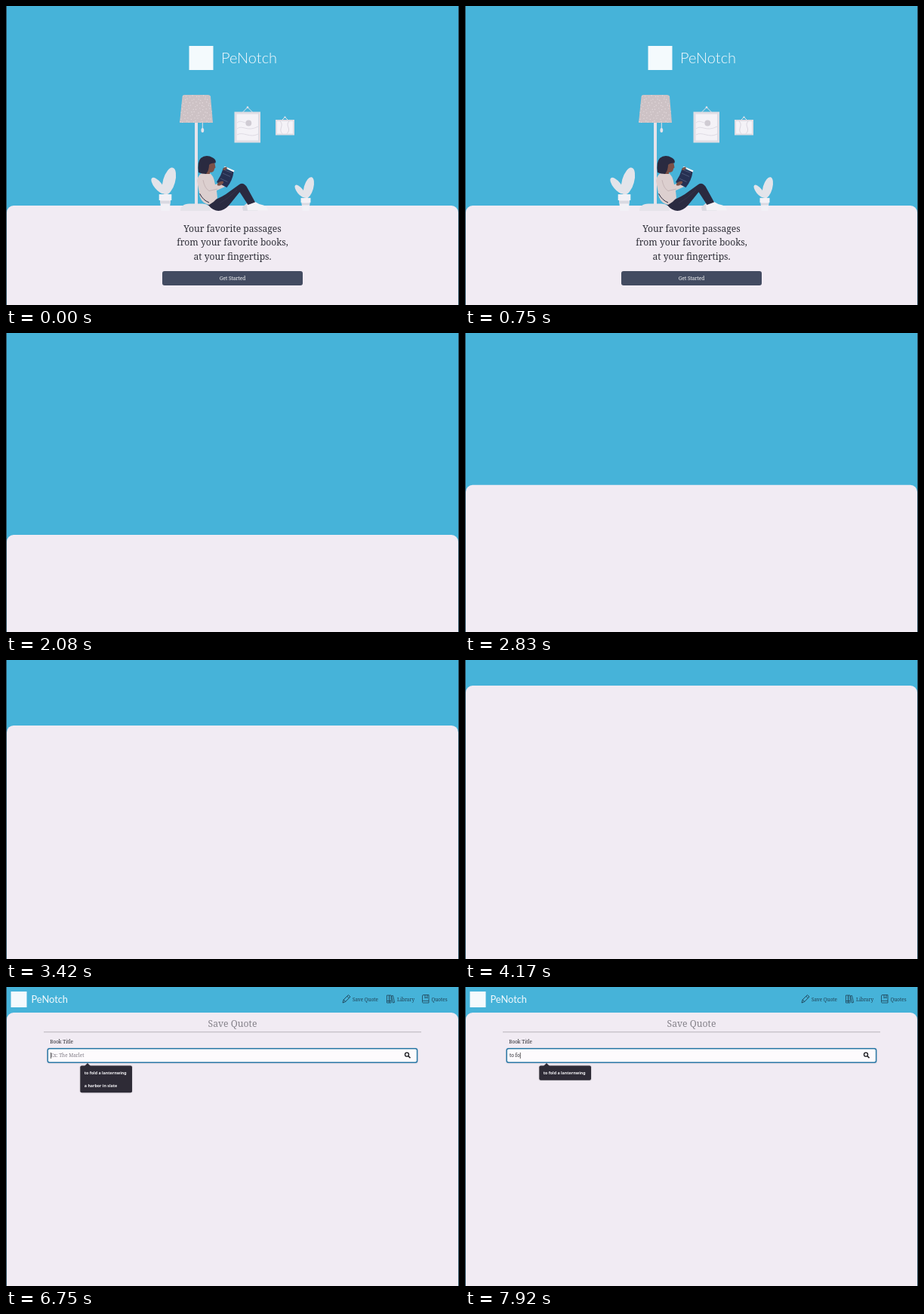
Animation of 600x397 px, one loop 8 s. Source, as an HTML page with a canvas:

```html
<!DOCTYPE html>
<html lang="en">
<head>
<meta charset="utf-8">
<title>PeNotch</title>
<style>
  html, body { margin: 0; width: 100%; height: 100%; overflow: hidden; background: #46b3d9; }
  canvas { display: block; width: 600px; height: 397px; }
</style>
</head>
<body>
<canvas id="stage"></canvas>
<script>
const W = 600, H = 397, LOOP = 8000;
const BLUE = '#46b3d9', PANEL = '#f1ebf3', PALE = '#e5e3ea', NAVY = '#2a2a40', SKIN = '#7b5148', INK = '#1f3f52';
const SLAB = '"Noto Serif", serif', SANS = '"Noto Sans", sans-serif', BRAND = 'Lato, sans-serif';

const canvas = document.getElementById('stage');
const g = canvas.getContext('2d');
const dpr = window.devicePixelRatio || 1;
canvas.width = W * dpr;
canvas.height = H * dpr;

const clamp = v => Math.max(0, Math.min(1, v));
const ramp = (t, a, b) => {
  const k = clamp((t - a) / (b - a));
  return k * k * (3 - 2 * k);
};

// Panel top edge over time: it dips, then rises and settles under the header.
const slide = [[1920, 265], [2080, 268], [2450, 280], [2830, 202], [3330, 97], [3420, 87], [3700, 56], [4150, 34]];

function slope(i) {
  const a = slide[i - 1], b = slide[i], c = slide[i + 1];
  if (!a || !c || (b[1] - a[1]) * (c[1] - b[1]) <= 0) return 0;
  return (c[1] - a[1]) / (c[0] - a[0]);
}

function panelTop(t) {
  if (t <= slide[0][0]) return slide[0][1];
  for (let i = 0; i < slide.length - 1; i++) {
    const [t0, y0] = slide[i], [t1, y1] = slide[i + 1];
    if (t > t1) continue;
    const d = t1 - t0, s = (t - t0) / d, r = 1 - s;
    return y0 * (1 + 2 * s) * r * r + y1 * s * s * (3 - 2 * s)
      + d * s * r * (slope(i) * r - slope(i + 1) * s);
  }
  return slide[slide.length - 1][1];
}

function text(str, x, y, size, color, family = SLAB, weight = 400, align = 'left') {
  g.font = `${weight} ${size}px ${family}`;
  g.textAlign = align;
  g.fillStyle = color;
  g.fillText(str, x, y);
}

function fill(d, color) {
  g.fillStyle = color;
  g.fill(new Path2D(d));
}

function line(d, color, width = 1) {
  g.strokeStyle = color;
  g.lineWidth = width;
  g.stroke(new Path2D(d));
}

function rect(x, y, w, h, color) {
  g.fillStyle = color;
  g.fillRect(x, y, w, h);
}

function round(x, y, w, h, r, color) {
  g.beginPath();
  g.roundRect(x, y, w, h, r);
  g.fillStyle = color;
  g.fill();
}

function oval(x, y, rx, ry, color, turn = 0) {
  g.beginPath();
  g.ellipse(x, y, rx, ry, turn, 0, Math.PI * 2);
  g.fillStyle = color;
  g.fill();
}

function fade(alpha, draw) {
  if (alpha <= 0) return;
  g.save();
  g.globalAlpha = alpha;
  draw();
  g.restore();
}

function lamp() {
  round(250, 150, 4, 115, 0, PALE);
  fill('M231 272 Q231 263 243 262.5 H260 Q271 263 271 272 Z', PALE);
  line('M260.3 154 V163', PALE, 1);
  oval(260.3, 165, 1.9, 3, PALE);
  const shade = new Path2D('M236 118 H268 Q270.5 118 271 120.500 L274 155 H230 L233.500 120.500 Q234 118 236 118 Z');
  g.fillStyle = '#cdc2c5';
  g.fill(shade);
  g.save();
  g.clip(shade);
  for (let row = 0; row < 9; row++) {
    for (let col = 0; col < 11; col++) {
      const x = 230 + col * 4.4 + (row % 2) * 2.2 + Math.sin(row * 5 + col * 3);
      const y = 120 + row * 4.2 + Math.cos(col * 4 + row);
      oval(x, y, 0.7, 0.7, '#e3d9dc');
    }
  }
  g.restore();
}

function pictures() {
  line('M313.5 141 L320 134.5 L326.5 141', PALE, 1);
  oval(320, 134.5, 1.3, 1.3, PALE);
  rect(302.5, 140.5, 34.5, 41, '#dfdde4');
  rect(305.5, 143.5, 28.5, 35, '#f4f2f7');
  oval(321.300, 155.500, 3.9, 3.9, '#cfcbd3');
  line('M306 163 C313 157 319 168 334 160 M306 171 C314 166 323 176 334 170 M306 155 C311 151 314 155 318 155', '#dcd9e1', 0.9);

  line('M365.5 151.500 L369.5 147.500 L373.5 151.500', PALE, 1);
  oval(369.5, 147.500, 1.1, 1.1, PALE);
  rect(357, 151, 25, 20.5, '#dfdde4');
  rect(359, 153, 21, 16.5, '#f4f2f7');
  line('M363 153 C369 158 360 164 366 169.500 M375 153 C369 159 379 163 372 169.500', '#d6d3dc', 0.9);
}

function plant(x, size) {
  g.save();
  g.translate(x, 272);
  g.scale(size, size);
  line('M0 -20 L5 -38 M0 -20 L-9 -33', '#dcdce3', 1);
  oval(5, -39.5, 8, 18.5, '#e3e4ea', 0.27);
  oval(-9.500, -33.500, 5.2, 13, '#e3e4ea', -0.68);
  rect(-8.3, -22, 16.6, 8, '#f2f1f6');
  fill('M-7 -14 H7 L5.5 0 H-5.5 Z', '#f2f1f6');
  fill('M-7 -13.5 H7 L6.5 -9.5 H-6.500 Z', '#d9d9e1');
  g.restore();
}

function reader() {
  // shoes
  fill('M313 267 L320 261 Q327 266 333 267.500 Q335 271 333 272 H314 Z', '#dcdbe3');
  fill('M319 264 L329 259.500 Q335 263.500 341 264.500 Q346 266 347 271.500 H320 Z', '#f3f2f6');
  // legs
  fill('M266 261 Q280 257 291 250 L309 237 Q314 233.500 318.500 239.500 L330 260.500 L320.500 264 L309.500 247 L295 265 Q287 273.500 278 271.500 Q270 269 266 261 Z', NAVY);
  line('M283 262 Q294 256 306 244', '#3b3b54', 0.6);
  // sweater
  fill('M261 221 Q254 224 253 232 L257 254 Q260 262 269 264 Q276 260 280 255 L279 245 L290 240 L287 234 L277 237 Q275 224 269 221.500 Z', '#dccfcf');
  line('M261 231 Q263 242 269 245.500 L280 243', '#b9a8ab', 0.7);
  line('M256.500 249 Q261 258 269 261', NAVY, 1);
  // head
  fill('M264 218 L270 218 L270 223 L264 223 Z', SKIN);
  fill('M266 205 Q274 204 276.500 209 L277.500 214.500 L276 216 Q276 221 270 221 L265 218 Z', SKIN);
  fill('M255 221 Q253 207 258 202 Q265 196.500 274 201.500 Q279 204.500 277.500 208.500 Q271 208 269 211 Q269 218 265 223 Q259 223 255 221 Z', NAVY);
  // book and hands
  fill('M288.500 213.500 L290 213 L302.500 218.500 L301.500 221 Z', '#f6f3f5');
  fill('M288 215 L301.500 220.500 Q300 232 292.500 241 L279 234 Q285 225 288 215 Z', '#263052');
  line('M287 222 L297 226.500 M284 229 L293.500 233.500 M290 218 L299 221.500', '#65718f', 0.6);
  oval(290, 216, 3, 1.7, SKIN, -0.5);
  oval(284, 235.500, 4.6, 2.2, SKIN, -0.5);
}

function landing(t) {
  rect(242.500, 53, 32, 32, '#f4fafd');
  text('PeNotch', 285, 76, 20, '#f4fafd', BRAND, 300);
  lamp();
  pictures();
  plant(211, 1);
  plant(397, 0.78);
  reader();

  ['Your favorite passages', 'from your favorite books,', 'at your fingertips.'].forEach((str, i) =>
    text(str, 300, 299.5 + i * 18.500, 12.100, '#2f2f38', SLAB, 300, 'center'));

  const hover = ramp(t, 950, 1300);
  g.save();
  g.shadowColor = `rgba(40, 40, 60, ${0.35 * hover})`;
  g.shadowBlur = 3 * dpr;
  g.shadowOffsetY = dpr;
  const mix = (a, b) => Math.round(a + (b - a) * hover);
  round(207, 352, 186, 19, 3, `rgb(${mix(67, 115)}, ${mix(75, 124)}, ${mix(97, 143)})`);
  g.restore();
  text('Get Started', 300, 363.800, 6.5, `rgb(255, 255, 255, ${1 - 0.15 * hover})`, SLAB, 500, 'center');
}

function header() {
  rect(6.500, 6, 21, 21, '#f4fafd');
  text('PeNotch', 33.5, 20.700, 12.8, '#f4fafd', BRAND, 400);

  g.lineJoin = 'round';
  line('M446 21 L447.200 16.800 L453.500 10.500 L456 13 L449.700 19.500 Z M447.200 16.800 L449.700 19.500 M451.800 12.200 L454.300 14.700', INK, 0.9);
  line('M504.500 11 H507.500 V21 H504.500 Z M507.500 11 H510 V21 H507.500 Z M510.500 12 L512.500 11.400 L514.600 20.400 L512.500 21 Z M504.500 18.500 H510', INK, 0.8);
  line('M553 10.500 H560 V21 H552.500 Q551.500 21 551.500 19.500 V12 Q551.500 10.500 553 10.500 Z M551.500 19 Q552 18.300 553 18.300 H560 M555 10.500 V15 L556.500 13.700 L558 15 V10.500', INK, 0.8);
  text('Save Quote', 459, 18.500, 6.4, INK);
  text('Library', 518, 18.500, 6.4, INK);
  text('Quotes', 563.500, 18.500, 6.4, INK);
}

// Moments at which each key lands in the search field.
const QUERY = 'to fo', KEYS = [6990, 7200, 7420, 7740, 7900];

function form(t) {
  text('Save Quote', 300, 52.500, 12.200, '#85828a', SLAB, 300, 'center');
  rect(50, 59.300, 500, 1, '#b7b3ba');
  text('Book Title', 58.300, 75, 6.4, '#26262c');

  g.save();
  g.shadowColor = 'rgba(60, 50, 80, 0.22)';
  g.shadowBlur = 2.5 * dpr;
  g.shadowOffsetY = 0.5 * dpr;
  round(55, 81.500, 490, 19, 2.5, '#fdfbfd');
  g.restore();

  const focus = t >= 5750;
  const typed = QUERY.slice(0, KEYS.filter(k => t >= k).length);
  if (focus) {
    g.beginPath();
    g.roundRect(55.200, 81.800, 489.400, 18.500, 2.5);
    g.strokeStyle = '#2a78a6';
    g.lineWidth = 1.5;
    g.stroke();
  }
  if (typed) text(typed, 59, 93.200, 6.4, '#26262c');
  else text('Ex: The Marlet', 59, 93.200, 6.4, '#807c86');
  if (focus && (typed || (t - 5750) % 1000 < 500)) {
    g.font = `400 6.4px ${SLAB}`;
    rect(59 + (typed ? g.measureText(typed).width + 0.2 : 0), 87, 0.7, 8, '#222');
  }

  g.beginPath();
  g.arc(531, 89.700, 2.5, 0, Math.PI * 2);
  g.strokeStyle = '#17171c';
  g.lineWidth = 1.3;
  g.stroke();
  line('M533 91.700 L535.500 94.200', '#17171c', 1.6);

  fade(ramp(t, 5780, 5900), () => suggestions(typed ? 1 : 2));
}

function suggestions(rows) {
  g.save();
  g.shadowColor = 'rgba(0, 0, 0, 0.25)';
  g.shadowBlur = 2 * dpr;
  round(98.300, 104.500, 68.700, 19.300 + (rows - 1) * 16.500, 2, '#2e2b36');
  g.restore();
  fill('M104 105 L108 101 L112 105 Z', '#2e2b36');
  ['to fold a lanternwing', 'a harbor in slate'].slice(0, rows).forEach((str, i) =>
    text(str, 103.800, 116.200 + i * 16.500, 5.3, '#f5f4f7', SANS, 600));
}

function render(t) {
  g.setTransform(dpr, 0, 0, dpr, 0, 0);
  rect(0, 0, W, H, BLUE);
  const top = panelTop(t);
  round(1, top, 598, H - top + 20, 9, PANEL);
  fade(1 - ramp(t, 1720, 2040), () => landing(t));
  const enter = ramp(t, 4200, 4750);
  fade(enter, () => {
    header();
    form(t);
  });
  rect(0, 0, 0.9, H, 'rgba(38, 42, 52, 0.8)');
  rect(599.100, 0, 0.9, H, 'rgba(38, 42, 52, 0.8)');
}

function tick(now) {
  render(now % LOOP);
  requestAnimationFrame(tick);
}
render(0);
requestAnimationFrame(tick);
</script>
</body>
</html>
```
